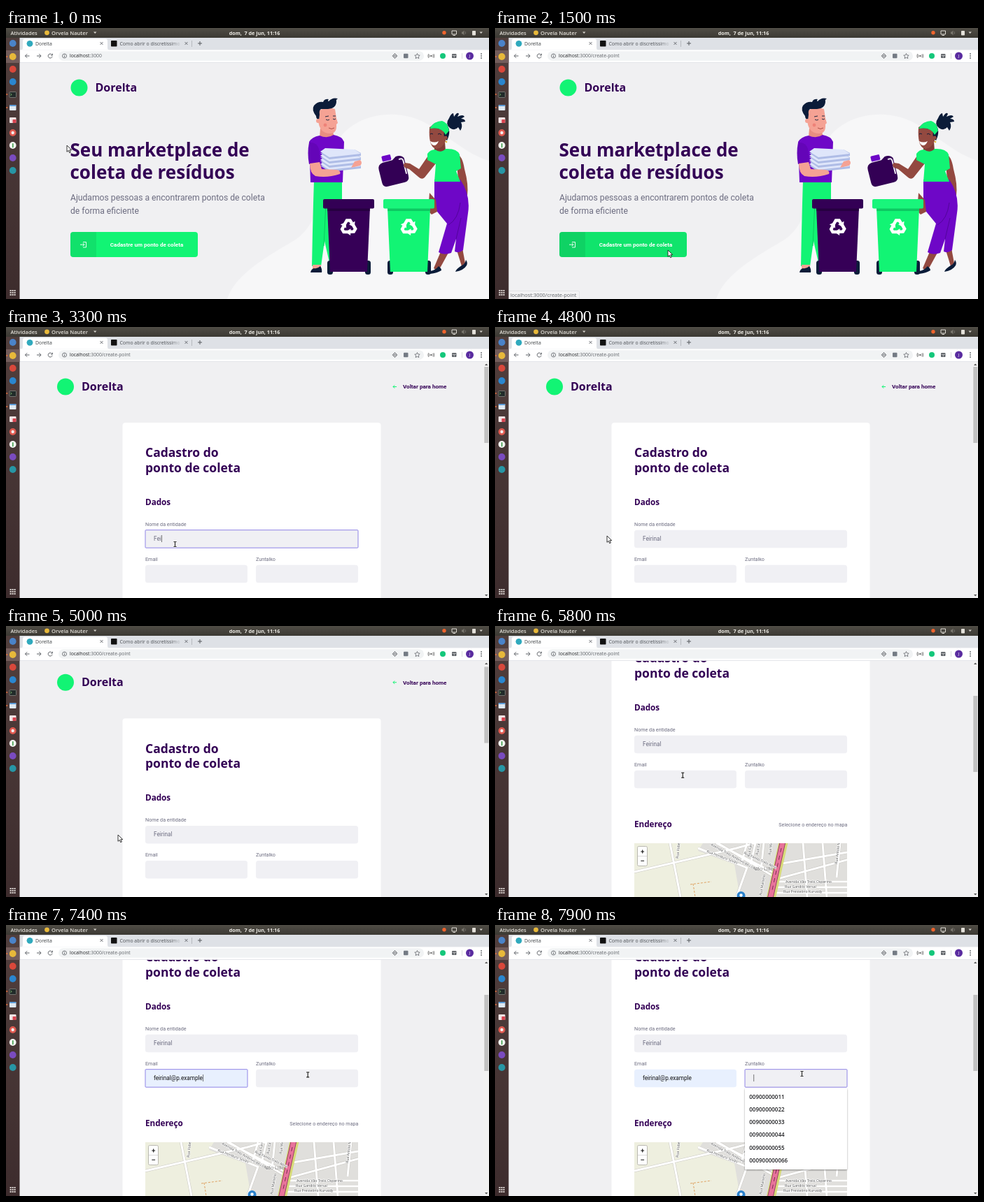
An HTML page for the animation above (8 s loop, 690x388 px).

```html
<!DOCTYPE html>
<html lang="pt-BR">
<head>
<meta charset="utf-8">
<title>Cadastro</title>
<style>
html, body { margin: 0; width: 100%; height: 100%; overflow: hidden; background: #f0f0f2; }
svg { display: block; width: 690px; height: 388px; }
text { white-space: pre; }
.ui { font-family: "Open Sans", "Noto Sans", sans-serif; }
.head { font-family: "Open Sans", "Noto Sans", sans-serif; font-weight: 700; fill: #330055; }
.body { font-family: Roboto, sans-serif; fill: #6c6c80; }
.map { font-family: "Noto Sans", sans-serif; fill: #555; font-size: 5.1px; }
</style>
</head>
<body>
<svg id="stage" viewBox="0 0 690 388"></svg>
<script>
const GREEN = '#12f474', PURPLE = '#330055', VIOLET = '#6e07c7', NAVY = '#0b1c39';
const PEACH = '#f5a294', BROWN = '#934940', FIELD = '#f0f0f4', PAGE = '#f0f0f2';
const BRAND = 'Dorelta', ENTITY = 'Feirinal', EMAIL = 'feirinal@p.example';
const MAILS = [EMAIL, 'feirino@p.example'];
const PHONES = ['00900000011', '00900000022', '00900000033', '00900000044', '00900000055', '000900000066'];

const text = (cls, x, y, size, str, extra = '') =>
  `<text class="${cls}" x="${x}" y="${y}" font-size="${size}" ${extra}>${str}</text>`;
const rect = (x, y, w, h, fill, r = 0, extra = '') =>
  `<rect x="${x}" y="${y}" width="${w}" height="${h}" rx="${r}" fill="${fill}" ${extra}/>`;
const dot = (x, y, r, fill, extra = '') => `<circle cx="${x}" cy="${y}" r="${r}" fill="${fill}" ${extra}/>`;
const shape = (d, fill, extra = '') => `<path d="${d}" fill="${fill}" ${extra}/>`;
const line = (d, color, width = 1, extra = '') =>
  `<path d="${d}" fill="none" stroke="${color}" stroke-width="${width}" ${extra}/>`;
const round = 'stroke-linecap="round" stroke-linejoin="round"';

function desktop() {
  const launchers = [[22, '#4a83c9'], [41, '#e8b93a'], [59, '#d9483b'], [77, '#2a86cf'],
    [150, '#e05a50'], [168, '#f4f6f2'], [186, '#7a4bc0'], [204, '#2796a5']];
  return rect(0, 0, 690, 14, 'url(#bar)') +
    text('ui', 6.5, 9.7, 7.6, 'Atividades', 'fill="#e4e1da" font-weight="600"') +
    dot(58.5, 6.8, 3.4, '#e8b93a') +
    text('ui', 65, 9.7, 7.6, 'Orvela Nauter', 'fill="#e4e1da" font-weight="600"') +
    shape('M125 5.5h4.4l-2.2 2.6z', '#dcd9d2') +
    text('ui', 355, 9.7, 7.2, 'dom,  7 de jun, 11:16', 'fill="#f0eee8" font-weight="700" text-anchor="middle"') +
    dot(626, 6.8, 2.7, '#f0642d') +
    line('M637 4h6.5v5h-6.5zM638.5 10.5h3.5', '#dcd9d2', 1) +
    shape('M651 5.5h1.5l2-2v7l-2-2h-1.5z', '#77746c') + line('M656 5q1.5 2 0 4', '#77746c', .8) +
    rect(666, 4, 5, 6.5, '#e4e1da', .8) + shape('M676.5 5.5h4.4l-2.2 2.6z', '#dcd9d2') +
    rect(0, 14, 19.5, 374, 'url(#dock)') + rect(0, 32, 19.5, 18, '#735d5b') +
    launchers.map(([y, c]) => dot(9.7, y, 4.9, c)).join('') +
    dot(9.7, 150, 2.2, '#f4eeee') + rect(9, 165, 1.6, 6.4, '#3f9e4b', .8) +
    rect(5, 91.5, 9.5, 8, '#222b2a', 1, 'stroke="#8d918c" stroke-width=".7"') +
    line('M6.5 94l1.7 1.3l-1.7 1.3', '#8fd07a', .8) +
    rect(5, 110, 9.5, 8, '#dfe9f2', 1) + rect(5, 110, 9.5, 2, '#5b9bd8', .8) +
    rect(5, 128, 9.5, 8, '#f1e4e4', 1) + rect(9.5, 131, 5, 5, '#d84450', .8) +
    [41, 95, 114].map(y => dot(1.3, y, 1, '#e8713c')).join('') +
    [6.6, 9.6, 12.6].map(x => [376, 379, 382].map(y => rect(x - 1, y - 1, 2, 2, '#ddd6d3')).join('')).join('');
}

function browser() {
  const close = x => line(`M${x - 2} 20l4 4m0-4l-4 4`, '#5f6368', .9);
  return rect(19.5, 14, 670.5, 17.5, '#dee1e6') +
    shape('M21 31.5q3 0 3-3v-10q0-3 3-3h115q3 0 3 3v10q0 3 3 3z', '#fff') +
    dot(34, 22.3, 4.4, '#2fa9bd') + text('ui', 42, 24.8, 6.9, BRAND, 'fill="#3c4043"') + close(136.5) +
    rect(150, 18, 8.5, 8.5, '#111', .8) +
    text('ui', 162.5, 24.8, 6.9, 'Como abrir o discretíssimo', 'fill="url(#fade)"') + close(257.5) +
    line('M265.5 18v9', '#a5a9ae', .7) + line('M274 22h6m-3-3v6', '#54585c', 1) +
    rect(19.5, 31.5, 670.5, 18, '#fff') +
    line('M33.5 40h-6m2.7-2.8l-2.8 2.8l2.8 2.8', '#5f6368', 1) +
    line('M44 40h6m-2.7-2.8l2.8 2.8l-2.8 2.8', '#5f6368', 1) +
    line('M65.7 38.4a3 3 0 1 0 .4 2.4M66.4 36.7v2.3h-2.3', '#5f6368', 1) +
    rect(75, 33.2, 522, 13.6, '#f1f3f4', 6.8) +
    line('M83.5 39.5v2.4M83.5 37.6v.9', '#5f6368', .9) + dot(83.5, 40, 3, 'none', 'stroke="#5f6368" stroke-width=".8"') +
    text('ui', 91, 42.4, 6.8, '<tspan fill="#202124">localhost</tspan>:3000<tspan id="route">/create-point</tspan>', 'fill="#5f6368"') +
    dot(555.5, 40, 2.5, 'none', 'stroke="#5f6368" stroke-width=".9"') + dot(555.5, 40, 1, '#5f6368') +
    line('M555.5 36.3v1.2m0 5v1.2M551.8 40h1.2m5 0h1.2', '#5f6368', .9) +
    rect(568, 36.8, 6.5, 6.5, '#747b84', 1) +
    line('M587.5 36.5l1.1 2.4l2.6.3l-1.9 1.8l.5 2.6l-2.3-1.3l-2.3 1.3l.5-2.6l-1.9-1.8l2.6-.3z', '#5f6368', .8) +
    dot(607.3, 40, 1, '#333') + line('M605 38q-1 2 0 4M609.6 38q1 2 0 4M603.6 37q-1.6 3 0 6M611 37q1.6 3 0 6', '#555', .7) +
    dot(624, 40, 4, '#15c77b') + rect(637, 37, 6.5, 6, '#5f6368', 1) + line('M637.5 39.3h5.5M640.3 39.5v3', '#fff', .6) +
    line('M651.5 36v8', '#c6c8cb', .7) +
    dot(662.5, 40, 5.5, '#5a2ca0') + text('ui', 662.5, 42.2, 6, 'J', 'fill="#fff" text-anchor="middle"') +
    [37, 40, 43].map(y => dot(679, y, .9, '#5f6368')).join('') + rect(19.5, 49, 670.5, .7, '#dcdde2');
}

function bin(x, fill, shade, lid) {
  const arrow = line('M-5.3-3.3L-2.3-8.5H1.8L4-4.9', '#fff', 4) + shape('M.5-3.3L8-7.3L7.3.4z', '#fff');
  const wheels = [10, 64].map(dx => rect(x + dx - 4, 333, 8, 20, NAVY, 3.5)).join('');
  return wheels + shape(`M${x + 6} 257h61l-4 92h-53z`, fill) +
    shape(`M${x + 6} 257h61l-.3 5h-60.4z`, shade) +
    rect(x, 245, 73, 13.5, lid, 2) +
    `<g transform="translate(${x + 36.5} 285) scale(1.13)">${[0, 120, 240].map(a => `<g transform="rotate(${a})">${arrow}</g>`).join('')}</g>`;
}

function people() {
  const sheets = [0, 1, 2, 3].map(i => {
    const y = 197 - i * 6;
    return shape(`M449 ${y}l13 9l45-5v-4l-9-5z`, '#aebce6') +
      shape(`M449 ${y - 2}l13 8l45-5l-9-6l-42-2z`, '#dfe6fa');
  }).join('');
  const man =
    shape('M440 218h40v60l-16 62h-1l-8-35l-5 36h-13q1-60 3-123z', GREEN) + line('M457 250l-3 62', '#0dc95f', 1) +
    shape('M438 339h12v5q-4 3-12 2z', PEACH) + shape('M435 350q1-5 5-6q5 1 9-3q3 4 2 9z', NAVY) +
    shape('M449 144h17l3 13q-11 5-21-1z', '#e88e81') +
    shape('M433 163q4-7 15-9q11 5 20-1q12 2 15 10l-2 58h-46z', VIOLET) +
    shape('M446 119q11-7 24-3l2 13l2 7l-2 2q1 13-9 13q-16 0-17-20z', PEACH) +
    shape('M443 126q-7-9-3-15q5-6 13-5q2-5 8-4q-2 2 0 3q5-6 13-4q-3 2-2 4q0 10-12 11h-10q-3 2-2 8l-1 8q-4-2-4-6z', NAVY) +
    dot(446, 133, 3, PEACH) +
    line('M457 131q3 2 5 0M467 130q2 2 4 0M456 127l5-1M467 126l4 0', NAVY, .9) + line('M461 143q4 3 8 0', '#a7443f', .9) +
    dot(456, 139, 2.4, '#ee8278') + sheets +
    shape('M433 164q11-1 14 9l2 19l-16 3q-3-16 0-31z', '#6405b8') +
    shape('M434 194l14-2l3 10l22 1q6 2 4 6q-18 6-35 3q-8-4-8-18z', PEACH) +
    shape('M498 191l8-2q4 4 0 8l-13 3z', PEACH);
  const jug =
    '<g transform="rotate(-14 555 206)">' +
    shape('M542 189h14l6-4q8-1 11 5v26q0 8-7 8h-25q-7 0-7-7v-19q0-8 8-9z', PURPLE) +
    line('M566 190q5-1 5 4v18', '#efedf3', 2, round) + rect(542, 180, 13, 8, VIOLET, 1.5) + '</g>';
  const woman =
    shape('M643 180q9 2 12 22q6 22 4 38l-16 10l-5-20l8-12z', BROWN) +
    shape('M622 318l11 2l-12 22l-6 5l-4-3z', BROWN) + shape('M606 348q7-1 12-7q4 3 4 6q-6 4-16 5z', NAVY) +
    shape('M643 315l9 0l4 22l-5 4z', BROWN) + shape('M651 340q5-2 6-8q3 4 1 8q-4 7-16 9q1-4 9-9z', NAVY) +
    shape('M612 217h37q15 22 11 48l-7 53q-6 5-12 2l2-18l-7 20q-11 4-18-1l12-41l-18-22z', VIOLET) +
    line('M632 282q14-8 17-32M650 272l-7 30', '#53049b', 1) +
    shape('M605 236l9 10l2 17l-8 4l-5-5z', BROWN) +
    shape('M603 183l11 11l-16 20q-4 4-9-1l-13-11l-6-2q-4-4 0-7l7 1l13 8z', BROWN) +
    shape('M612 163h15l1 13q-9 6-16-1z', '#7f3a35') +
    shape('M602 180q4-6 11-6q8 6 15-1q16-1 20 8l2 20l-7 4l6 15h-37l2-25l-12-6z', GREEN) +
    shape('M605 142q14-8 24 0l-1 20q-6 12-14 11q-11-3-9-31z', BROWN) +
    shape('M606 143q8-13 23-6q8 10 1 24q-6-2-4-14q-9-4-20-4z', NAVY) +
    shape('M634 143q-7-6-1-14q3-7 6-7l1 5q5-8 7-4l-2 4q8-4 10 0l-5 3q6 0 6 4l-6 1q3 6-1 12l-3-5q-5 6-12 1z', NAVY) +
    shape('M605 144q7-11 18-11q8 2 10 14l-5 6q-5-12-23-9z', GREEN) +
    line('M606 152q2-2 4 0M617 152q3-2 5 1', NAVY, 1) + shape('M606 162q6 3 12 0q-3 7-7 6q-4-1-5-6z', '#fff') +
    dot(628, 157, 2.6, BROWN) + dot(629, 163, 1.3, '#e7b83c');
  return man + jug + woman + bin(453, '#360057', '#260040', '#330055') + bin(539, GREEN, '#0dc862', '#19f57b');
}

function home() {
  return rect(19, 49, 671, 339, PAGE) +
    shape('M316 388C328 352 372 328 412 304C462 272 440 200 476 158C505 119 566 113 608 141C645 165 662 182 690 190V388z', '#f7f7f8') +
    dot(104.5, 85.5, 12, GREEN) + text('head', 127.5, 91, 16, BRAND) +
    text('head', 91.5, 184, 26, 'Seu marketplace de') + text('head', 91.5, 215.5, 26, 'coleta de resíduos') +
    text('body', 92, 247, 12.15, 'Ajudamos pessoas a encontrarem pontos de coleta') + text('body', 92, 266, 12.15, 'de forma eficiente') +
    rect(92, 292, 182, 36, GREEN, 4, 'id="button"') +
    shape('M96 292h33v36h-33q-4 0-4-4v-28q0-4 4-4z', '#000', 'opacity=".08"') +
    line('M110 306.5h4.5v7.5h-4.5M106 310.2h6m-2.2-2.2l2.2 2.2l-2.2 2.2', '#fff', .9) +
    text('body', 201, 312.8, 8.1, 'Cadastre um ponto de coleta', 'text-anchor="middle" font-weight="700" style="fill:#fff"') +
    people() +
    `<g id="status">${rect(19.5, 376.5, 101, 12, '#f2f2f3', 1.5, 'stroke="#d9dadd" stroke-width=".6"')}${text('ui', 22, 385, 7.4, 'localhost:3000/create-point', 'fill="#5f6368"')}</g>`;
}

function street(x, y, angle, name) {
  return text('map', 0, 0, 5.1, name, `transform="translate(${x} ${y}) rotate(${angle})" stroke="#fff" stroke-width="1.2" paint-order="stroke"`);
}

function map() {
  const roads = 'M199 352L345 318L425 296M250 311L265 388M300 300L404 362L520 330M290 318L360 346L345 388M316 311L402 355' +
    'M360 311L352 340M372 311L364 346M385 300L380 350M400 366H510M400 374H510M400 382H510M440 311L446 388M468 311L474 388M494 300L488 360M410 340L503 324';
  return '<g transform="translate(0 134)" clip-path="url(#mapClip)">' +
    rect(199, 311, 304, 140, '#eeefdf') + shape('M297 311H503V451H340L350 388L342 341L290 322z', '#e0dfdc') +
    line(roads, '#c9c7c2', 4) + line(roads, '#fff', 3) +
    line('M413 305L392 400', '#d7da78', 13) + line('M412 305L391 400', '#8d3a5e', 8.5) + line('M412 305L391 400', '#e8739a', 6.8) +
    line('M409 318L396 378', '#7a2d55', 1, 'stroke-dasharray="6 5"') +
    line('M279 370L309 366M283 369L286 388', '#dd9a55', .9, 'stroke-dasharray="3 2"') +
    street(262, 333, -84, 'Rua Vobel') + street(308, 314, 29, 'Avenida Trelo Ambrivo da Losta') +
    street(302, 324, 21, 'Rua Honduro Silvão') + street(355, 326, 25, 'Rua Fanilo Trelo Abru') +
    street(364, 331, -80, 'Rua Farrel') + street(376, 328, -82, 'Rua Capilo') + street(394, 328, -83, 'Rua Marluz') +
    street(489, 341, -83, 'Rua Antolo Mevra') + street(381, 386, -80, 'Rua Mantelo') +
    street(415, 367.5, 0, 'Avenida Vão Trelo Osperino') + street(414, 375, 0, 'Rua Gandilo Versal') + street(412, 382, 0, 'Rua Prestelino Kurvady') +
    text('map', 370, 350, 7, 'Vão Lião', 'style="font-size:7px;fill:#8a8a8a"') +
    shape('M351.5 401q-6-9-6-15a6 6 0 0 1 12 0q0 6-6 15z', '#2a81cb') + dot(351.5, 385.5, 2.2, '#fff') +
    rect(203.5, 315.5, 14, 28, '#fff', 2, 'stroke="#b9b8b0"') + line('M204 329.5h13', '#ccc', .7) +
    line('M208.3 323h4.8m-2.4-2.4v4.8M208.3 336.3h4.8', '#111', 1.1) + '</g>';
}

function form() {
  const label = (x, y, s) => text('body', x, y, 7.2, s);
  const field = (id, x, y, w) => rect(x, y, w, 25.5, FIELD, 3.5, `id="${id}Box"`) +
    text('body', x + 12, y + 15.3, 8.2, '', `id="${id}"`);
  return rect(19, 49, 671, 339, PAGE) + '<g id="page">' +
    dot(85, 85.5, 12, GREEN) + text('head', 108, 91, 16, BRAND) +
    line('M558 85.5h-5m2.2-2.2l-2.2 2.2l2.2 2.2', GREEN, 1) +
    text('body', 567, 88.3, 8.1, 'Voltar para home', 'font-weight="700" style="fill:#330055"') +
    rect(166.5, 137, 369, 700, '#fff', 4) +
    text('head', 199, 186.3, 17.5, 'Cadastro do') + text('head', 199, 207.8, 17.5, 'ponto de coleta') +
    text('head', 199, 255, 11.7, 'Dados') + label(199, 285, 'Nome da entidade') + field('entity', 199, 290.7, 304) +
    label(199, 335, 'Email') + label(357, 335, 'Zuntalko') + field('email', 199, 340.7, 146) + field('phone', 357, 340.7, 146) +
    text('head', 199, 422, 11.7, 'Endereço') + text('body', 503.5, 420.7, 7.2, 'Selecione o endereço no mapa', 'text-anchor="end"') +
    map() + line('', '#555', .8, 'id="caret"') + '</g>' +
    rect(682.5, 49.5, 7.5, 338.5, '#f1f1f1') + rect(683.3, 57, 6, 109, '#c1c1c1', 0, 'id="thumb"') +
    shape('M684 55l2.2-2.5l2.2 2.5z', '#555') + shape('M684 383l2.2 2.5l2.2-2.5z', '#555');
}

function menu(id, x, items) {
  return `<g id="${id}">` + rect(x, 233.5, 146, 8 + items.length * 18.1, '#fff', 1.5, 'filter="url(#shadow)"') +
    rect(x, 237, 146, 18.1, '#e8e8ea', 0, `id="${id}Hover"`) +
    items.map((s, i) => text('ui', x + 6.3, 248.8 + i * 18.2, 8, s, 'fill="#202124" font-weight="600"')).join('') + '</g>';
}

const beamPath = 'M-2-3.5h1.3l.7.5l.7-.5h1.3M0-3v6M-2 3.5h1.3l.7-.5l.7.5h1.3';
document.getElementById('stage').innerHTML = `<defs>
  <linearGradient id="bar" x2="0" y2="1"><stop stop-color="#504d46"/><stop offset="1" stop-color="#3b3933"/></linearGradient>
  <linearGradient id="dock" x2="0" y2="1"><stop stop-color="#513f3d"/><stop offset="1" stop-color="#3d2c2d"/></linearGradient>
  <linearGradient id="fade" gradientUnits="userSpaceOnUse" x1="236" x2="251"><stop stop-color="#4a4e53"/><stop offset="1" stop-color="#dee1e6"/></linearGradient>
  <filter id="shadow" x="-10%" y="-10%" width="120%" height="125%"><feDropShadow dx="0" dy="1" stdDeviation="1" flood-opacity=".4"/></filter>
  <clipPath id="view"><rect x="19.5" y="49.5" width="670.5" height="338.5"/></clipPath>
  <clipPath id="mapClip"><rect x="199" y="311" width="304" height="140"/></clipPath></defs>
  <g clip-path="url(#view)"><g id="home">${home()}</g><g id="form">${form()}</g>${menu('mails', 199, MAILS)}${menu('phones', 357, PHONES)}</g>
  ${browser()}${desktop()}
  <g id="cursor"><g id="pointer">${shape('M0 0v9.3l2.2-2l1.5 3.4l1.6-.7l-1.5-3.3h3z', '#fff', 'stroke="#222" stroke-width=".9"')}</g>
  <g id="ibeam">${line(beamPath, '#fff', 2.4)}${line(beamPath, '#222', 1.2)}</g></g>`;

const el = Object.fromEntries([...document.querySelectorAll('#stage [id]')].map(n => [n.id, n]));
const LOOP = 8000, SCROLL = 134;
const PATH = [[0, 87, 168], [150, 87, 168], [900, 247, 318], [1650, 247, 318], [2100, 241.5, 311], [4250, 241.5, 311],
  [4650, 160, 299], [5400, 160, 299], [5750, 268, 213], [6000, 270, 218], [6650, 270, 218], [6850, 262, 245],
  [7050, 262, 245], [7450, 438.5, 213]];

const clamp = v => Math.max(0, Math.min(1, v));
const ease = v => { v = clamp(v); return v * v * (3 - 2 * v); };
const during = (t, from, to) => t >= from && t < to;
const show = (node, on) => node.setAttribute('visibility', on ? 'inherit' : 'hidden');
const typed = (str, t, start, step) => str.slice(0, Math.max(0, Math.floor((t - start) / step) + 1));

function cursorAt(t) {
  const i = PATH.findIndex(p => p[0] > t);
  if (i < 0) return PATH[PATH.length - 1].slice(1);
  const [t0, x0, y0] = PATH[i - 1], [t1, x1, y1] = PATH[i];
  const k = ease((t - t0) / (t1 - t0));
  return [x0 + (x1 - x0) * k, y0 + (y1 - y0) * k];
}

function render(t) {
  const onForm = t >= 1600;
  const hover = ease((t - 700) / 200);
  show(el.home, !onForm);
  show(el.form, onForm);
  show(el.route, t >= 1400);
  show(el.status, !onForm && t >= 800);
  el.button.setAttribute('fill', `rgb(${18 - 2 * hover},${244 - 16 * hover},${116 - 8 * hover})`);

  const scrolled = ease((t - 4950) / 450);
  el.page.setAttribute('transform', `translate(0 ${-SCROLL * scrolled})`);
  el.thumb.setAttribute('y', 57 + 43 * scrolled);

  const filled = t >= 6850;
  el.entity.textContent = typed(ENTITY, t, 2900, 150);
  el.email.textContent = filled ? EMAIL : typed(EMAIL.slice(0, 2), t, 6250, 150);
  el.email.style.fill = filled ? '#111' : '';
  el.emailBox.setAttribute('fill', filled ? '#e8f0fe' : FIELD);

  const focus = { entity: [2500, 4600], email: [6000, 7500], phone: [7500, LOOP] };
  show(el.caret, false);
  for (const [id, [from, to]] of Object.entries(focus)) {
    const active = during(t, from, to);
    el[id + 'Box'].setAttribute('stroke', active ? '#8f84e6' : 'none');
    el[id + 'Box'].setAttribute('rx', active ? 1 : 3.5);
    if (!active) continue;
    const last = id === 'entity' && t > 2900 ? Math.min(t, 4000) : id === 'email' && t > 6250 ? 6400 : from;
    const x = +el[id].getAttribute('x') + (el[id].textContent ? el[id].getComputedTextLength() : 0) + .7;
    const y = +el[id].getAttribute('y');
    el.caret.setAttribute('d', `M${x} ${y - 8}v10`);
    show(el.caret, (t - last) % 1000 < 500);
  }
  show(el.mails, during(t, 6250, 7000));
  show(el.mailsHover, during(t, 6850, 7000));
  show(el.phones, t >= 7700);
  show(el.phonesHover, false);

  const beam = during(t, 1750, 4400) || during(t, 5700, 6700) || t >= 7350;
  el.cursor.setAttribute('transform', `translate(${cursorAt(t)})`);
  show(el.pointer, !beam);
  show(el.ibeam, beam);
}

const start = performance.now();
function tick() {
  render((performance.now() - start) % LOOP);
  requestAnimationFrame(tick);
}
render(0);
tick();
</script>
</body>
</html>
```
